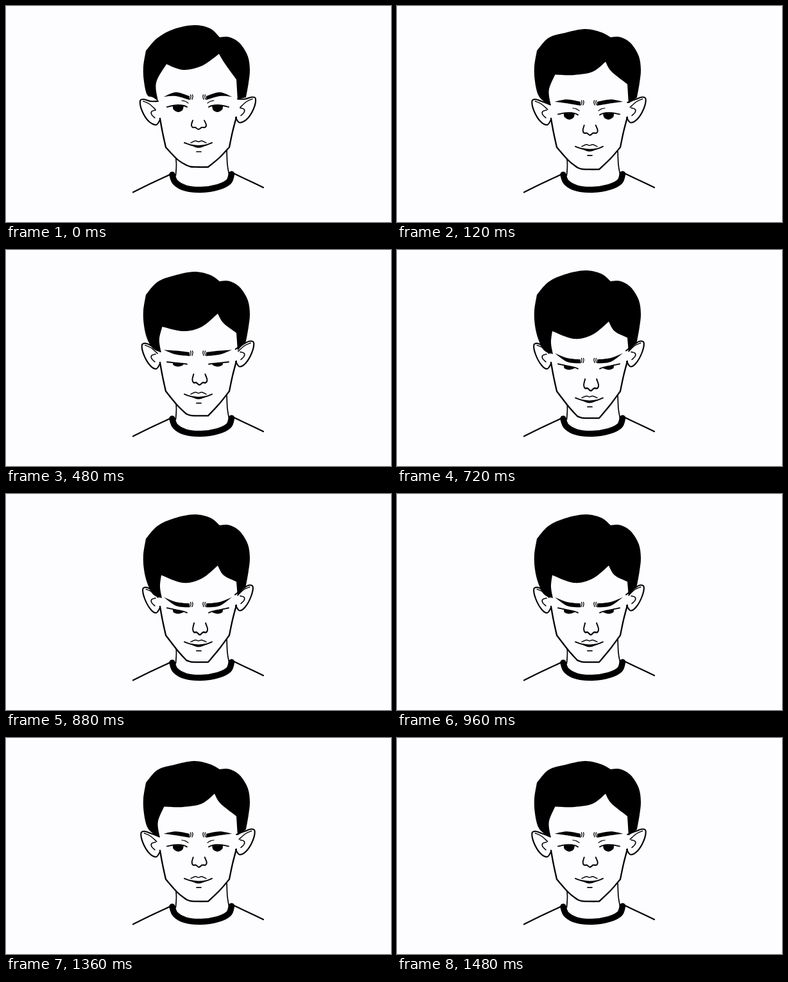
An HTML page with a canvas that plays this animation: 600x338 px, repeating every 1560 ms.

```html
<!DOCTYPE html>
<html lang="en">
<head>
<meta charset="utf-8">
<title>Nodding head</title>
<style>
html, body { margin: 0; height: 100%; overflow: hidden; background: #fdfcfe; }
canvas { display: block; width: 600px; height: 338px; }
</style>
</head>
<body>
<canvas id="stage" width="600" height="338"></canvas>
<script>
const ctx = document.getElementById('stage').getContext('2d');
const PAPER = '#fdfcfe', INK = '#000', LOOP = 1560;

// Smooth curve through each section's x, y pairs; sections meet in sharp corners.
function curve(...sections) {
  const path = new Path2D();
  let last = null;
  for (const nums of sections) {
    const pts = last ? [last] : [];
    for (let i = 0; i < nums.length; i += 2) pts.push([nums[i], nums[i + 1]]);
    if (!last) path.moveTo(...pts[0]);
    for (let i = 0; i < pts.length - 1; i++) {
      const b = pts[i], c = pts[i + 1], a = pts[i - 1] || b, d = pts[i + 2] || c;
      path.bezierCurveTo(b[0] + (c[0] - a[0]) / 6, b[1] + (c[1] - a[1]) / 6,
        c[0] - (d[0] - b[0]) / 6, c[1] - (d[1] - b[1]) / 6, c[0], c[1]);
    }
    last = pts[pts.length - 1];
  }
  return path;
}

const fill = (...sections) => ctx.fill(curve(...sections));

function line(width, ...sections) {
  ctx.lineWidth = width;
  ctx.stroke(curve(...sections));
}

function at(x, y, draw) {
  ctx.save();
  ctx.translate(x, y);
  draw();
  ctx.restore();
}

// Draws the left side, then its mirror image moved by dy.
function bothSides(draw, dy = 0) {
  draw();
  at(598, dy, () => {
    ctx.scale(-1, 1);
    draw();
  });
}

function drawBody() {
  line(1.7, [264, 230, 265.5, 248, 264.5, 265]);
  line(1.7, [344, 225, 345, 248, 347.5, 263]);
  line(2.2, [198, 291.5, 224, 278.5, 256, 263.5]);
  line(2.2, [355, 262, 378, 273, 401, 284]);
  line(9.6, [259, 264, 264, 276, 280, 285, 304, 287.5, 330, 283.5, 347, 275, 351.5, 263]);
}

function drawFace(chin) {
  const jaw = 240 + (chin - 252) * 0.4;
  const outline = [[240, 176, 244, 198, 249, 221], [267, jaw, 281, chin - 3],
    [288, chin - 0.5, 300, chin, 315, chin], [333, jaw - 3, 348, 221], [353, 197, 359, 174]];
  ctx.fillStyle = PAPER;
  fill(...outline);
  ctx.fillStyle = INK;
  line(2.3, ...outline);
}

function drawHair({ nod, ease, top, belly, partX }) {
  const cornerX = 250 - 8 * ease, cornerY = 91 + 36 * ease;
  const partY = 75 + 12.3 * nod, burn = 149 + 14 * ease;
  const side = 234 + 6 * ease;
  fill(
    [side + 3, burn, 229, burn - 6, 220, 139, 215, 118, 214, 95, 218, 70],
    [236, 50, 262, top + 6, 293, top, 318, top + 5, 333, 49],
    [343, 48, 354, 51, 366, 60, 377, 79, 380, 100, 378, 120, 374, 143],
    [361, burn - 3],
    [359, 70 + 0.6 * partY],
    [partX + 9, partY + 15, partX, partY],
    [305, belly - (belly - partY) / 4, 276, belly, cornerX, cornerY],
    [side, (cornerY + burn) / 2, side + 3, burn]
  );
}

function drawEar(nod, ease) {
  const tip = 209 + 1.4 * nod, root = 237 + 4 * ease;
  line(2.1, [root, 149 + 12 * ease, 225, 149, tip + 5, 146, tip, 149, tip + 3, 164,
    222 + nod, 180, 234, 186, 240, 178]);
  line(1.5, [tip + 5, 149, tip + 14, 153, root - 4, 162]);
  line(1.6, [233, 163, 227, 165, 227, 170, 232, 175]);
}

function drawBrow(y, tilt, arch) {
  fill([246, y - tilt, 265, y - arch, 286, y + tilt - 1], [286, y + tilt + 5],
    [265, y - arch + 6, 246, y - tilt]);
  for (const x of [287.5, 290.5]) line(1.3, [x, y + tilt - 3, x + 0.6, y + tilt, x - 0.5, y + tilt + 4]);
}

function drawEye(y, tilt, open) {
  const arch = open ? 2 : 0, depth = open ? 10 : 5.5;
  line(1.9, [251, y + arch - tilt, 260, y - tilt / 2, 268, y - arch / 2, 277, y + tilt / 2, 282, y + arch + tilt]);
  fill([260, y - tilt / 2, 277, y + tilt / 2],
    [275, y + depth * 0.7, 268, y + depth, 261, y + depth * 0.6, 260, y - tilt / 2]);
  if (open) line(1.2, [274, y - 8, 279, y - 7, 284, y - 4]);
}

function drawNose(nod) {
  at(300 + nod * 0.7, 192 + 9 * nod, () => {
    ctx.scale(1, 1 + nod / 10);
    line(1.9, [-9, -13, -11, -6, -9, -2, -5, -2, 0, 1, 5, -2, 10, -2, 12, -6, 9, -13]);
  });
}

function drawMouth(y) {
  at(300, y, () => {
    line(1.9, [-22, 0, -12, 3.5, 0, 5, 12, 3.5, 21, 0]);
    fill([-13, 3.5, 0, 4.5, 14, 3.5], [0, 8, -13, 3.5]);
    line(1.5, [-12, 0, -5, -3, 0, -1.5, 5, -3, 12, 0]);
    line(1.7, [-3, 14, 4, 14]);
  });
}

function drawHead(pose) {
  const { nod, ease } = pose;
  const tilt = 0.6 * nod * nod;
  drawFace(252 + 3.7 * nod);
  drawHair(pose);
  bothSides(() => drawEar(nod, ease), -3.5);
  bothSides(() => {
    drawBrow(142 + 8.3 * nod, tilt, 7 - 3 * nod);
    drawEye(156 + 26 * ease, tilt * 0.7, nod < 2);
  });
  drawNose(nod);
  drawMouth(214 + 5.8 * nod);
}

// Four held poses, from head up to head down; ease slows toward the lowest one.
const poses = [
  { top: 30, belly: 100, partX: 332 },
  { top: 36, belly: 108, partX: 325 },
  { top: 34, belly: 127, partX: 330 },
  { top: 32, belly: 139, partX: 330 }
].map((pose, nod) => ({ ...pose, nod, ease: 1 - (1 - nod / 3) ** 1.5 }));

// End time in ms, pose index.
const timeline = [[120, 0], [480, 1], [720, 2], [1200, 3], [1360, 2], [LOOP, 1]];

function frame() {
  const t = performance.now() % LOOP;
  const [, index] = timeline.find(([end]) => t < end);
  ctx.fillStyle = PAPER;
  ctx.fillRect(0, 0, 600, 338);
  ctx.fillStyle = ctx.strokeStyle = INK;
  ctx.lineCap = ctx.lineJoin = 'round';
  drawBody();
  drawHead(poses[index]);
  requestAnimationFrame(frame);
}
frame();
</script>
</body>
</html>
```
